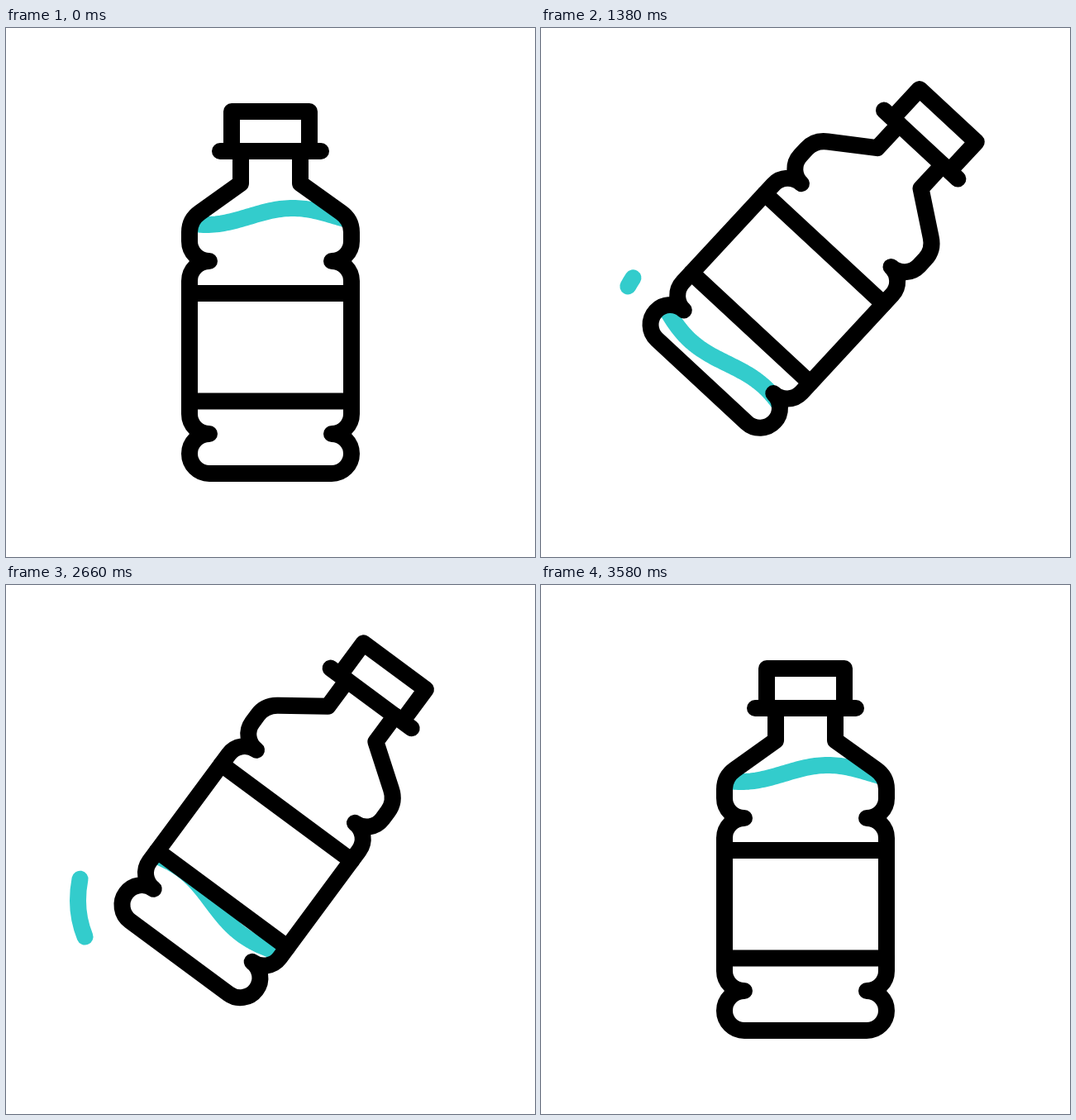
Write an HTML page with a canvas that moves like this. It is 640 by 640 pixels and loops after 3600 ms.

```html
<!DOCTYPE html>
<html lang="en">
<head>
<meta charset="utf-8">
<title>Tilting bottle</title>
<style>
  html, body { margin: 0; width: 100%; height: 100%; overflow: hidden; background: #fff; }
  canvas { display: block; width: 640px; height: 640px; }
</style>
</head>
<body>
<canvas id="stage" width="640" height="640"></canvas>
<script>
const ctx = document.getElementById('stage').getContext('2d');
const LOOP = 3600;
const TEAL = '#33cccc';
const SWOOSH_LENGTH = 713;
const rad = degrees => degrees * Math.PI / 180;

// Steep ease in and out: cubic-bezier(.85, 0, .15, 1)
function ease(x) {
  if (x <= 0) return 0;
  if (x >= 1) return 1;
  let low = 0, high = 1;
  for (let i = 0; i < 30; i++) {
    const s = (low + high) / 2, r = 1 - s;
    if (2.55 * s * r * r + 0.45 * s * s * r + s * s * s < x) low = s;
    else high = s;
  }
  return low * low * (3 - 2 * low);
}
const tween = (t, start, duration) => ease((t - start) / duration);

// One open line: down the left side, along the base, up the right side.
const arcTo = (x, y) => `A24 24 0 0 0 ${x} ${y}`;
const outline = new Path2D(
  'M284 149V188L235 223Q222 232 222 247V258' + arcTo(246, 282) + arcTo(222, 306) +
  'V467' + arcTo(246, 491) + arcTo(246, 539) +
  'H394' + arcTo(394, 491) + arcTo(418, 467) +
  'V306' + arcTo(394, 282) + arcTo(418, 258) + 'V247Q418 232 405 223L356 188V149');
const details = new Path2D('M273 149V101H367V149M259 149H381M222 321H418M222 451.5H418');

const swoosh = new Path2D();
swoosh.ellipse(291, 296, 238, 238, 0, rad(7), rad(90));
swoosh.ellipse(291, 382, 204, 152, 0, rad(90), rad(180));
swoosh.ellipse(291, 382, 204, 168, 0, rad(180), rad(209.2));

function drawWave(tilt) {
  const level = 228 + 282 * tilt;
  const crest = 347 - 612 * tilt;
  ctx.save();
  ctx.clip(outline);
  ctx.beginPath();
  for (let x = 200; x <= 440; x += 3) {
    ctx.lineTo(x, level - 10 * Math.cos((x - crest) / 210 * 2 * Math.PI));
  }
  ctx.strokeStyle = TEAL;
  ctx.stroke();
  ctx.restore();
}

function drawBottle(tilt) {
  ctx.save();
  ctx.translate(320 + 24 * tilt, 320 - 55 * tilt);
  ctx.rotate(rad(44 * tilt));
  ctx.translate(-320, -320);
  drawWave(tilt);
  ctx.fillStyle = '#fff';
  ctx.fillRect(222, 321, 196, 130.5);
  ctx.strokeStyle = '#000';
  ctx.stroke(outline);
  ctx.stroke(details);
  ctx.restore();
}

function drawSwoosh(from, to) {
  if (to - from < 0.002) return;
  ctx.save();
  ctx.strokeStyle = TEAL;
  ctx.setLineDash([(to - from) * SWOOSH_LENGTH, 2000]);
  ctx.lineDashOffset = -from * SWOOSH_LENGTH;
  ctx.stroke(swoosh);
  ctx.restore();
}

function draw(t) {
  ctx.fillStyle = '#fff';
  ctx.fillRect(0, 0, 640, 640);
  ctx.lineWidth = 20;
  ctx.lineCap = ctx.lineJoin = 'round';
  drawBottle(tween(t, 0, 1736) - tween(t, 2020, 1580));
  if (t < 1860) drawSwoosh(tween(t, 322, 1300), tween(t, 194, 1300));
  else drawSwoosh(1 - tween(t, 2148, 1237), 1 - tween(t, 2200, 1410));
}

let startTime;
function frame(now) {
  startTime ??= now;
  draw(Math.max(0, now - startTime) % LOOP);
  requestAnimationFrame(frame);
}
draw(0);
requestAnimationFrame(frame);
</script>
</body>
</html>
```
